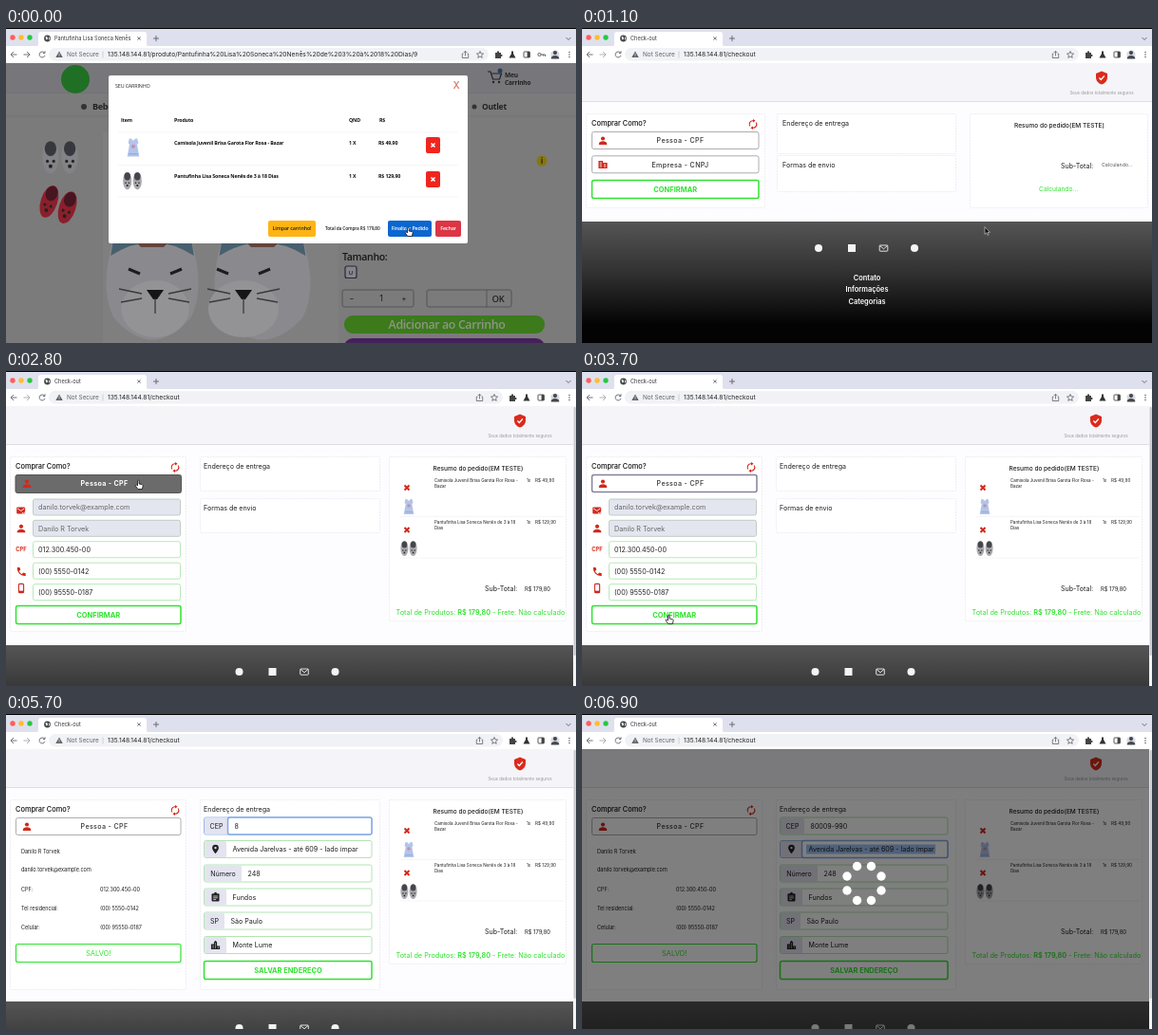
Animation, 600 px wide and 332 px high, one loop 7 s. Source, as an HTML page:

```html
<!DOCTYPE html>
<html lang="pt-BR">
<head>
<meta charset="utf-8">
<title>Check-out</title>
<style>
html, body { margin: 0; width: 100%; height: 100%; overflow: hidden; background: #fff; }
svg { display: block; width: 100vw; height: 100vh; font-family: Inter, "Liberation Sans", sans-serif; }
.narrow { font-family: "Open Sans", "Noto Sans", sans-serif; font-stretch: 75%; letter-spacing: -.03em; }
</style>
</head>
<body>
<svg id="stage" viewBox="0 0 600 332"></svg>
<script>
const LOOP = 7000, STEP = 100;
const RED = '#d3281c', GREEN = '#2ee32e', LINE = '#e9e9f3', INK = '#1c1c1e';
const DRESS = 'Camisola Juvenil Brisa Garota Flor Rosa - ', DRESS_END = 'Bazar';
const SHOES = 'Pantufinha Lisa Soneca Nenês de 3 à 18 ', SHOES_END = 'Dias';
const USER = {
  name: 'Danilo R Torvek', mail: 'danilo.torvek@example.com',
  cpf: '012.300.450-00', home: '(00) 5550-0142', cell: '(00) 95550-0187'
};
const OLD_CEP = '00012-000', NEW_CEP = '80009-990';

// Shape helpers; text is centred vertically on y.
const rect = (x, y, w, h, fill, r = 0, more = '') =>
  `<rect x="${x}" y="${y}" width="${w}" height="${h}" rx="${r}" fill="${fill}" ${more}/>`;
const box = (x, y, w, h, stroke, sw = 1, r = 2, fill = '#fff', more = '') =>
  rect(x, y, w, h, fill, r, `stroke="${stroke}" stroke-width="${sw}" ${more}`);
const circle = (x, y, r, fill, more = '') => `<circle cx="${x}" cy="${y}" r="${r}" fill="${fill}" ${more}/>`;
const oval = (x, y, rx, ry, fill) => `<ellipse cx="${x}" cy="${y}" rx="${rx}" ry="${ry}" fill="${fill}"/>`;
const path = (d, fill, more = '') => `<path d="${d}" fill="${fill}" ${more}/>`;
const stroke = (d, color, w = 1, more = '') => path(d, 'none', `stroke="${color}" stroke-width="${w}" ${more}`);
const group = (x, y, body, more = '') => `<g transform="translate(${x} ${y}) ${more}">${body}</g>`;
const text = (s, x, y, size = 7.1, fill = INK, weight = 400, anchor = 'start', more = '') =>
  `<text x="${x}" y="${(y + size * .36).toFixed(2)}" font-size="${size}" fill="${fill}" font-weight="${weight}" ` +
  `text-anchor="${anchor}" xml:space="preserve" ${more}>${s}</text>`;
const mid = (s, x, y, size, fill, weight, more) => text(s, x, y, size, fill, weight, 'middle', more);
const narrow = (s, x, y, size = 5.3, fill = '#111', weight = 700, anchor = 'start') =>
  text(s, x, y, size, fill, weight, anchor, 'class="narrow"');
const cross = (x, y, r, color, w) => stroke(`M${x - r} ${y - r}l${2 * r} ${2 * r}m0 ${-2 * r}l${-2 * r} ${2 * r}`, color, w);

const icon = {
  person: (x, y, c = RED) => group(x, y, circle(0, -2.2, 2.1, c) + path('M-4.2 4.2v-1c0-3.4 8.4-3.4 8.4 0v1z', c)),
  building: (x, y, c = RED) => group(x, y, path('M-4.6 4V-4H0V-2H4.6V4z', c) +
    stroke('M-3.2-2h2M-3.2 0h2M-3.2 2h2M1 0h2M1 2h2', '#fff', .9)),
  mail: (x, y, c) => group(x, y, box(-4.3, -3, 8.6, 6.2, c, .9, .8, 'none') + stroke('M-4-2.6L0 .8L4-2.6', c, .9)),
  mailBox: (x, y) => group(x, y, rect(-4.8, -3.4, 9, 7, RED, 1) + stroke('M-4-2.2L-.3 .4L3.4-2.2M.8 2l1.6 1.4L5 .6', '#fff', .9)),
  phone: (x, y) => group(x, y, path('M-4.2-4h2.7l.7 2.6-1.5 1.3C-1.4 1.5-.5 2.3.8 3l1.4-1.5 2.5.8v2.6C-1 5.2-4.6.8-4.2-4z', RED)),
  mobile: (x, y) => group(x, y, box(-2.6, -4.6, 5.2, 9.2, RED, 1.1, 1, 'none') + rect(-2.6, 2.6, 5.2, 2, RED)),
  refresh: (x, y) => group(x, y, stroke('M-3.2 2A3.7 3.7 0 0 1 .6-3.7M3.2-2A3.7 3.7 0 0 1-.6 3.7', RED, 1.1) +
    path('M0-5.5L2.600-3.700L0-1.900zM0 5.500L-2.600 3.700L0 1.900z', RED)),
  shield: (x, y) => group(x, y, path('M0-7L6-4.6V-.5C6 3.2 3.5 5.9 0 7C-3.5 5.9-6 3.2-6-.5V-4.6z', '#dc2a1c') +
    stroke('M-2.6 0L-.7 2L2.8-2', '#fff', 1.3)),
  pin: (x, y) => group(x, y, path('M0 4.8C-2.5 1.8-3.4.2-3.4-1.4a3.4 3.4 0 0 1 6.8 0C3.4.2 2.5 1.8 0 4.8z', '#222') + circle(0, -1.4, 1.2, '#e6e6f2')),
  board: (x, y) => group(x, y, rect(-4, -3.8, 8, 8.2, '#222', 1) + circle(0, -4, 1.3, '#222') + stroke('M-2.4-1h4.8M-2.4 .8h4.8M-2.4 2.6h3', '#e6e6f2', .8)),
  city: (x, y) => group(x, y, path('M-4.6 4.4V-1H-1.6V-3L0-4.8L1.6-3V1H4.6V4.4z', '#222') + stroke('M-3 .8h1M-3 2.7h1M-.5-1.5h1M-.5.6h1M-.5 2.6h1M2.5 2.7h1', '#e6e6f2', .9)),
  dress: (x, y, k = 1) => group(x, y, path('M-3.5-8h1.500l2 2 2-2h1.500l1 4-1.200 1 2 11h-10.600l2-11-1.200-1z', '#b3c4ea') + circle(0, -1, 1.8, '#c98fb4') + rect(-4, 5, 8, 1.2, '#98abda'), `scale(${k})`),
  shoes: (x, y, k = 1, base = '#a9a9ae', tone = '#45454c') => group(x, y, [-4.6, 4.6].map(dx =>
    oval(dx, 0, 4, 8, base) + oval(dx, -4, 2.8, 3.6, tone) + circle(dx - 1.5, 2, .7, '#222') + circle(dx + 1.5, 2, .7, '#222') + circle(dx, 4.4, .9, '#222')
  ).join(''), `scale(${k})`)
};

const arrow = (x, y) => group(x, y, path('M0-3.5V4.2L1.8 2.6 3 5.3 4.2 4.8 3 2.2H5.4z', '#111', 'stroke="#fff" stroke-width=".5"'));
const hand = (x, y) => group(x, y, path('M-1.5-4c0-1.2 1.6-1.2 1.6 0v3l3 .6c.9.2 1.2.8 1 1.6L3.4 4.5H-1.2L-3.7 1c-.5-1 .7-1.6 1.3-.9l.9.9z', '#fff', 'stroke="#111" stroke-width=".8"'));

function chrome(title, url, hasKey) {
  const g = '#5f6368';
  const tools = stroke('M496.5 27h-1.2v4.5h6.4V27h-1.2M498.5 29.5v-5M496.8 26l1.7-1.7 1.7 1.7', g, .8) +
    stroke('M514 24.5l1 2.4 2.6.2-2 1.7.6 2.6-2.2-1.4-2.2 1.4.6-2.6-2-1.7 2.6-.2z', g, .8) +
    path('M530 26h2c-.5-2.2 2.5-2.2 2 0h2v2c2.2-.5 2.2 2.5 0 2v2h-6z', '#444') +
    path('M547 24.5h2v2.5l2.5 4.5h-7l2.5-4.5z', '#333') +
    box(560, 25, 6.4, 6, '#444', .9, .8, 'none') + rect(563.6, 25, 2.8, 6, '#444');
  const key = circle(561.5, 28, 1.6, 'none', `stroke="${g}"`) + stroke('M563 28h4.500v2M565.500 28v1.600', g, 1);
  return rect(0, 0, 600, 19, '#dfe0ee') + rect(0, 0, 600, 1, '#000') +
    circle(7, 10, 2.7, '#ff5f57') + circle(16, 10, 2.7, '#febc2e') + circle(25, 10, 2.7, '#28c840') +
    path('M31 19.5q3 0 3-3V7q0-3 3-3h108q3 0 3 3v9.5q0 3 3 3z', '#fff') +
    circle(43.5, 11, 3.4, '#45484c') + path('M41.5 9l2 .5 .5 2-1.5 1zM45 9l1.3 2-1 2z', '#fff') +
    `<svg x="51" y="5" width="82" height="12">${text(title, 0, 6, 5.6, '#333')}</svg>` +
    cross(140, 11, 1.7, g, .8) + stroke('M155 11h6M158 8v6', g, .9) + stroke('M589.5 10l2.5 2.5 2.5-2.5', g, .9) +
    rect(0, 19, 600, 18, '#fff') + rect(45, 21, hasKey ? 463 : 478, 13.5, '#f1f2f6', 6.7) +
    stroke('M11.5 28H5M8 25l-3 3 3 3', g, .9) + stroke('M18.5 28H25M22 25l3 3-3 3', hasKey ? g : '#a5a8ae', .9) +
    stroke('M40.6 26.2A3 3 0 1 0 41 29M41 24.3v2.2h-2.2', g, .9) +
    path('M56 24.5l3.7 6.5h-7.4z', g) + stroke('M56 26.6v2M56 29.3v.8', '#fff', .7) +
    text('Not Secure', 64, 28, 6.4, g) + stroke('M102 24.5v7', '#bbb', .6) + text(url, 107, 28, 6.7, '#222') +
    (hasKey ? group(-15, 0, tools) + key : tools) +
    circle(578, 28, 4.6, '#d9dbe2') + icon.person(578, 28.3, '#44474e') +
    [25.5, 28, 30.5].map(y => circle(593, y, .8, g)).join('');
}

// Slipper with an animal face; the face sits off centre by dx.
function bigShoe(x, rx, dx) {
  const f = x + dx;
  return path(`M${x - rx * .8} 222H${x + rx * .8}Q${x + rx * 1.1} 275 ${x + rx * .8} 305Q${x} 352 ${x - rx * .8} 305Q${x - rx * 1.1} 275 ${x - rx * .8} 222z`, '#8a8a8e') +
    oval(f, 296, rx * .7, 30, '#939396') +
    path(`M${x - rx * .8} 222H${x + rx * .8}l3 18Q${x} 212 ${x - rx * .8 - 3} 240z`, '#48606e') +
    path(`M${x - rx * .4} 222H${x + rx * .4}L${x + 12} 231H${x - 12}z`, '#63443a') +
    stroke(`M${f - 28} 254l12 5M${f + 28} 254l-12 5`, '#1d1d20', 3) +
    path(`M${f - 9} 276H${f + 9}L${f + 2} 286H${f - 2}z`, '#151518') +
    stroke(`M${f} 285v16M${f - 14} 280l-24-5M${f - 14} 285l-22 4M${f + 14} 280l24-5M${f + 14} 285l22 4`, '#3a3a3d', 1.3);
}

function shop() {
  const page = rect(0, 37, 600, 295, '#7b7b7b') + rect(0, 37, 600, 31, '#77777b') + stroke('M0 68.5h600M0 93h600', '#707074', .7) +
    circle(73, 54, 15, '#1f7024') + circle(82, 83, 3, '#333') + narrow('Bebê', 91, 83, 9, '#222') +
    circle(493, 83, 2.5, '#333') + narrow('Outlet', 501, 83, 8.500, '#222') +
    stroke('M507 46h3l2.5 8h7l2-6h-10', '#222', 1.2) + circle(513, 57, 1.2, '#222') + circle(519, 57, 1.2, '#222') + circle(520, 45, 2.5, '#24405f') +
    narrow('Meu', 525, 50, 6.6, '#222') + narrow('Carrinho', 525, 57.5, 6.6, '#222') +
    icon.shoes(57, 136, 2.2, '#828287', '#37373e') + group(55, 186, icon.shoes(0, 0, 2.2, '#8b1f2b', '#451520'), 'rotate(18)') +
    rect(102, 110, 248, 222, '#7f7f7f') + bigShoe(154, 51, 3) + bigShoe(270, 53, -20) +
    circle(564, 140, 5.5, '#86760e') + mid('i', 564, 140, 8, '#222', 700) +
    narrow('Tamanho:', 354, 241, 10.5, '#161616', 600) + box(357, 251, 12, 12.5, '#2f2440', 1.2, 2, '#84848a') + narrow('U', 363, 257.5, 6, '#222', 600, 'middle') +
    box(354, 276, 75, 18, '#505055', .9, 2, 'none') + mid('−', 364, 285, 8) + mid('1', 395, 285, 9) + mid('+', 419, 285, 8) +
    box(443, 276, 89, 18, '#505055', .9, 2, 'none') + stroke('M506 276v18', '#505055', .8) + narrow('OK', 518, 285.5, 9.5, '#222', 600, 'middle') +
    rect(356, 303, 211, 19, '#3c7a1c', 9) + narrow('Adicionar ao Carrinho', 464, 312.5, 12.4, '#8f9488', 600, 'middle') +
    rect(356, 327, 211, 19, '#45205a', 9);
  const remove = y => rect(442, y, 15, 17, '#f0251f', 2) + cross(449.5, y + 8.5, 2, '#fff', 1.5);
  const row = (y, name, price) => narrow(name, 177, y) + narrow('1 X', 361, y) + narrow('R$ ' + price, 392, y);
  const modal = rect(108, 50, 378, 177, '#fff', 2) + narrow('SEU CARRINHO', 115, 61.5, 5.4, '#222', 500) +
    mid('X', 474, 60, 10, '#e0806c', 600) + stroke('M118 110h358M118 144.5h358M118 178h358', '#f1f1f4', .7) +
    narrow('Item', 121, 97) + narrow('Produto', 177, 97) + narrow('QND', 361, 97) + narrow('R$', 393, 97) +
    icon.dress(134, 126, 1.2) + icon.shoes(133, 161, 1.15) +
    row(121.5, DRESS + DRESS_END, '49,90') + row(156.5, SHOES + SHOES_END, '129,90') + remove(115) + remove(151) +
    rect(276, 203, 50, 17, '#ffb413', 2) + narrow('Limpar carrinho!', 301, 211.5, 5.4, '#222', 600, 'middle') +
    narrow('Total da Compra R$ 179,80', 336, 211.5, 4.8, '#222', 600) +
    rect(402, 203, 46, 17, '#0b66cf', 2) + narrow('Finalizar Pedido', 425, 211.5, 5.4, '#fff', 600, 'middle') +
    rect(452, 203, 27, 17, '#dc3545', 2) + narrow('Fechar', 465.5, 211.5, 5.4, '#fff', 600, 'middle');
  return page + modal;
}

function header(dx) {
  return rect(0, 37, 600, 295, '#fdfdff') + rect(0, 37, 600, 40.5, '#f5f5f9') + stroke('M0 77.5h600', '#d6d6de', .8) +
    icon.shield(547 + dx, 52.5) + mid('Seus dados totalmente seguros', 547 + dx, 68.5, 4.5, '#999');
}

function footer(dx, dy) {
  return group(dx, dy, rect(-dx, 204, 600, 128, 'url(#dark)') +
    circle(249, 232, 4, '#f4f4f4') + rect(280, 228, 8, 8, '#f4f4f4') + icon.mail(317.5, 232, '#f4f4f4') + circle(350, 232, 4, '#f4f4f4') +
    ['Contato', 'Informações', 'Categorias'].map((s, i) => mid(s, 300, 263 + i * 12.7, 7.4, '#fff', 600)).join(''));
}

const panel = (x, y, w, h) => box(x, y, w, h, LINE, .8, 1, '#fff', 'stroke-dasharray="2 1"');
const button = (s, y, w, weight = 700, sw = 1.5) =>
  box(10.5, y, w, 19, GREEN, sw, 2) + mid(s, 10.5 + w / 2, y + 9.7, 7.5, GREEN, weight);

function option(s, y, w, draw, look) {
  const on = look === 'hover';
  const frame = on ? box(10, y, w + 1, 19, '#555', 1, 2, '#6b6b6b')
    : box(10.5, y, w, 18, look === 'focus' ? '#85819c' : '#9a9a9e', look === 'focus' ? 1.5 : .8, 2);
  return frame + draw(22, y + 9.2) + mid(s, 103.5, y + 9.2, 7.1, on ? '#fff' : '#333', on ? 700 : 500, 'letter-spacing=".35"');
}

const buyer = (w, h, dx) => panel(4.5, 90.5, w, h) + text('Comprar Como?', 10, 100.5, 7.4, '#111', 500) + icon.refresh(180 + dx, 101.5);

function startPage() {
  return header(0) + buyer(188, 99, 0) +
    option('Pessoa - CPF', 109.5, 175.5, icon.person) + option('Empresa - CNPJ', 134.8, 175.5, icon.building) + button('CONFIRMAR', 160.5, 175.5) +
    panel(205.5, 90.5, 188, 42) + text('Endereço de entrega', 211, 100.5) + panel(205.5, 134.5, 188, 38) + text('Formas de envio', 211, 144.5) +
    panel(408.5, 90.5, 187, 99) + mid('Resumo do pedido(EM TESTE)', 502.5, 102.5, 6.5, INK, 500) +
    text('Sub-Total:', 504, 145) + text('Calculando...', 547, 144.5, 5.3, '#555') + text('Calculando...', 481, 169.5, 6.7, GREEN) +
    footer(0, 0);
}

function summary() {
  const item = (y, a, b, price) => cross(422, y + 8, 2.5, RED, 2) + text(a, 451, y, 4.5) + text(b, 451, y + 6.3, 4.5) +
    text('1x', 548, y, 4.4) + text('R$ ' + price, 557, y, 4.7);
  return panel(403.5, 90.5, 186, 173) + mid('Resumo do pedido(EM TESTE)', 497, 102.5, 6.5, INK, 500) +
    item(115, DRESS, DRESS_END, '49,90') + icon.dress(424, 143) + stroke('M415 153.5h172M415 197h172', '#f1f1f6', .7) +
    item(159.5, SHOES, SHOES_END, '129,90') + icon.shoes(424, 187) +
    text('Sub-Total:', 504, 229.5) + text('R$ 179,80', 546, 229.5, 5.8) +
    mid('Total de Produtos: <tspan font-weight="600">R$ 179,80</tspan> - Frete: Não calculado', 499.5, 254, 7.3, GREEN);
}

function buyerForm(t) {
  const look = t < 2300 ? '' : t < 3000 ? 'hover' : 'focus';
  const field = (s, y, off) => box(28.5, y, 155, 17, off ? '#b4c2b8' : '#a5e4a5', .8, 2, off ? '#e4e6ef' : '#fff') + text(s, 34, y + 8.8, 7.2, off ? '#666' : '#222');
  return buyer(185, 184, -2) + option('Pessoa - CPF', 109.5, 173.5, icon.person, look) +
    field(USER.mail, 135, true) + field(USER.name, 157.3, true) + field(USER.cpf, 179.7) + field(USER.home, 202.2) + field(USER.cell, 224.6) +
    icon.mailBox(16, 147) + icon.person(16, 166) + mid('CPF', 16, 188, 5.8, RED, 700) + icon.phone(16, 211) + icon.mobile(16, 229) +
    button('CONFIRMAR', 247.5, 173.5);
}

function buyerSaved() {
  const line = (a, b, y) => text(a, 16, y, 5.5) + text(b, 99, y, 5.5);
  return buyer(185, 200, -2) + option('Pessoa - CPF', 109.5, 173.5, icon.person) +
    line(USER.name, '', 145) + line(USER.mail, '', 164.5) + line('CPF:', USER.cpf, 185) +
    line('Tel residencial:', USER.home, 205) + line('Celular:', USER.cell, 225) + button('SALVO!', 242.5, 173.5, 400, 1.2);
}

function address(t) {
  const typing = t >= 5400, loading = t >= 6500;
  const cep = typing ? NEW_CEP.slice(0, t < 5700 ? 0 : 1 + Math.floor((t - 5700) / 85)) : OLD_CEP;
  const focus = loading ? 1 : typing ? 0 : t >= 4400 ? 2 : -1;
  const rows = [
    ['CEP', 109, 25, cep], [icon.pin, 133.5, 23, 'Avenida Jarelvas - até 609 - lado ímpar'], ['Número', 159, 39, '248'],
    [icon.board, 184, 23, 'Fundos'], ['SP', 209, 21, 'São Paulo'], [icon.city, 234.5, 23, 'Monte Lume']
  ];
  const row = ([tag, y, w, value], i) => {
    const edge = i === focus ? '#7fa8e4' : '#a0dfa0';
    return box(208.5, y, 176.5, 18, edge, .8, 2) + rect(209, y + .4, w, 17.2, '#e4e4f0', 1.5) +
      (typeof tag === 'string' ? mid(tag, 209 + w / 2, y + 9, 7.1) : tag(209 + w / 2, y + 9)) +
      (i === focus ? box(208.5 + w, y, 176.5 - w, 18, edge, 1.5, 2) : '') +
      (i === 1 && loading ? rect(236, y + 4, 136, 10, '#9fc4f5') : '') +
      text(value, 215.5 + w, y + 9) +
      (i === 2 && focus === 2 ? path('M374 167l2-2.5 2 2.5zM374 169.5l2 2.5 2-2.5z', '#444') : '');
  };
  return panel(204.5, 90.5, 189, 200) + text('Endereço de entrega', 208, 100.5) + rows.map(row).join('') +
    box(208.5, 260.5, 176.5, 19, GREEN, 1.5) + mid('SALVAR ENDEREÇO', 297, 270.2, 7.4, GREEN, 700);
}

function loader(t) {
  const turn = (t - 6900) * .3 + 22.5;
  const dots = Array.from({ length: 8 }, (_, i) => {
    const a = (turn + i * 45) * Math.PI / 180;
    return circle(297 + 19.5 * Math.cos(a), 178.5 + 19.5 * Math.sin(a), 4.7, '#fff');
  });
  return rect(0, 37, 597, 295, 'rgba(0,0,0,.5)') + dots.join('');
}

function fullPage(t) {
  const saved = t >= 4100, form = t >= 2300 && !saved;
  const empty = panel(204.5, 90.5, 189, 36) + text('Endereço de entrega', 208, 100.5) + panel(204.5, 134.5, 189, 36) + text('Formas de envio', 208, 144.5);
  const chooser = buyer(185, 99, -2) + option('Pessoa - CPF', 109.5, 173.5, icon.person) +
    option('Empresa - CNPJ', 134.8, 173.5, icon.building) + button('CONFIRMAR', 160.5, 173.5);
  return header(-6) + (saved ? buyerSaved() + address(t) : (form ? buyerForm(t) : chooser) + empty) + summary() +
    footer(-3.5, saved ? 99 : 85) + rect(597, 37, 3, 295, '#f4f4f6') + rect(597.7, 38, 2, 262, '#c6c6cc', 1) +
    (t >= 6500 ? loader(t) : '');
}

// Pointer stops: time, x, y
const STOPS = [[0, 424, 215], [1300, 424, 213], [2200, 140, 120], [2900, 140, 120], [3600, 92, 262], [4100, 92, 262], [4700, 122, 276], [5300, 122, 276]];

function pointer(t) {
  if (t >= 5300) return '';
  const i = STOPS.findIndex(s => s[0] > t), [t0, x0, y0] = STOPS[i - 1], [t1, x1, y1] = STOPS[i];
  const p = (t - t0) / (t1 - t0), k = p * p * (3 - 2 * p);
  const over = t < 800 || (t >= 2100 && t < 3000) || (t >= 3500 && t < 4200);
  return (over ? hand : arrow)(x0 + (x1 - x0) * k, y0 + (y1 - y0) * k);
}

const defs = '<defs><linearGradient id="dark" x1="0" y1="0" x2="0" y2="1"><stop stop-color="#555"/>' +
  '<stop offset=".4" stop-color="#333"/><stop offset=".85" stop-color="#030303"/></linearGradient></defs>';
const stage = document.getElementById('stage');

function draw(t) {
  const inShop = t < 800;
  const title = inShop ? SHOES : 'Check-out';
  const slug = (SHOES + SHOES_END).replace(/ /g, '%20');
  const url = '135.148.144.81/' + (inShop ? `produto/${slug}/9` : 'checkout');
  stage.innerHTML = defs + (inShop ? shop() : t < 1700 ? startPage() : fullPage(t)) + chrome(title, url, inShop) + pointer(t);
}

const begin = performance.now();
let last = -1;
function tick() {
  const t = Math.floor((performance.now() - begin) % LOOP / STEP) * STEP;
  if (t !== last) draw(last = t);
  requestAnimationFrame(tick);
}
tick();
</script>
</body>
</html>
```
